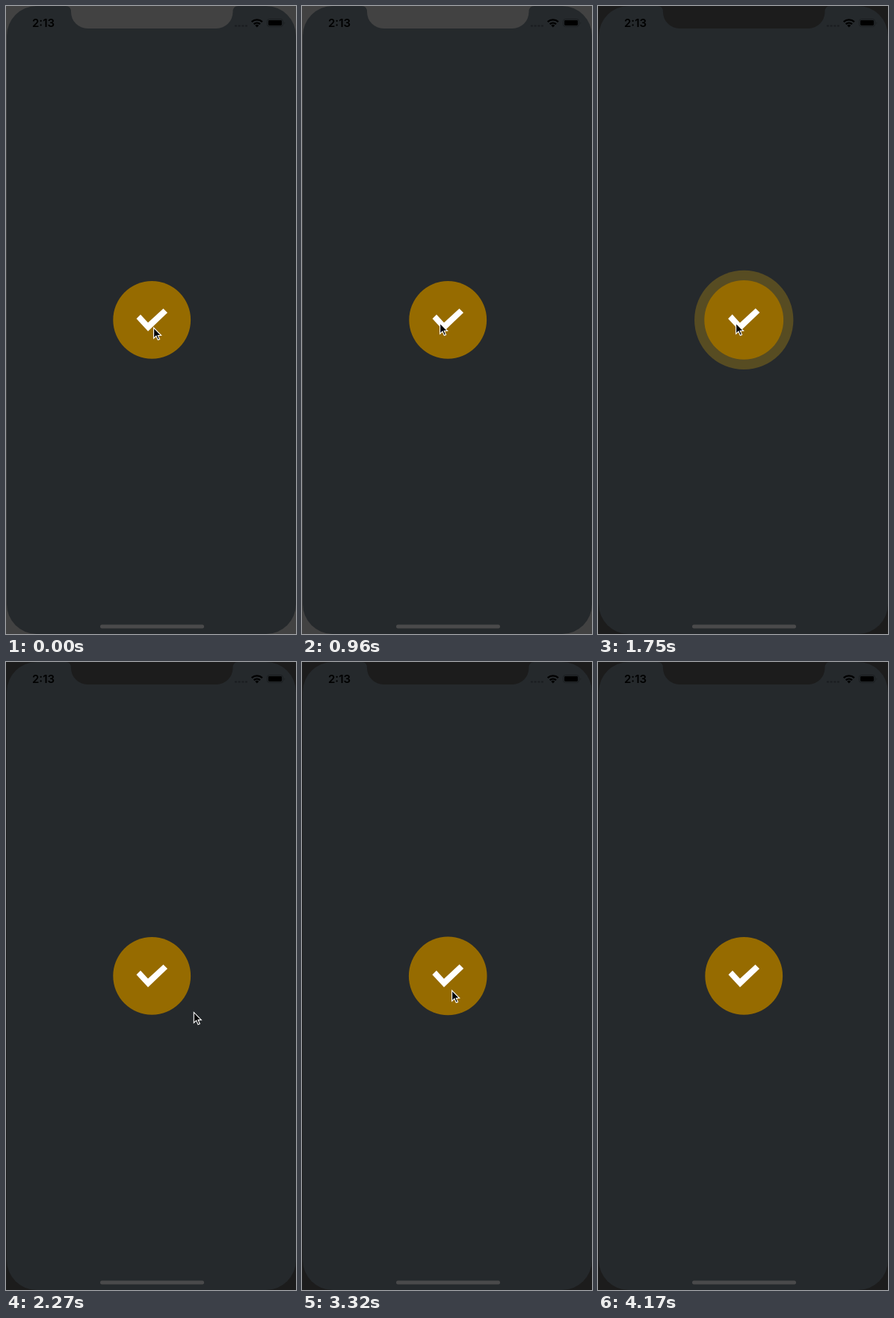
An HTML page that plays this animation: 388x838 px, repeating every 5150 ms.

```html
<!DOCTYPE html>
<html lang="en">
<head>
<meta charset="utf-8">
<title>Check button pulse</title>
<style>
  html, body { margin: 0; width: 100%; height: 100%; overflow: hidden; background: #1c1c1c; }
  svg { display: block; width: 388px; height: 838px; }
  text { font: 600 15px Inter, "Liberation Sans", sans-serif; }
</style>
</head>
<body>
<svg viewBox="0 0 388 838">
  <rect id="bezel" width="388" height="838"/>
  <rect x="1" width="387" height="838" rx="40" fill="#25292c"/>
  <path id="notch" d="M80 0Q87 0 87 8A22 22 0 0 0 109 30H281.5A22 22 0 0 0 303.5 8Q303.5 0 310.5 0Z"/>

  <text x="35" y="28.2">2:13</text>
  <path d="M306 26.5H323" stroke="#1a1d20" stroke-width="2" stroke-dasharray="3 1.7"/>
  <g fill="none" stroke="#000" stroke-width="2.3">
    <path d="M328.7 21.2A10.4 10.4 0 0 1 342.9 21.2"/>
    <path d="M331.6 24.2A6.2 6.2 0 0 1 340 24.2"/>
  </g>
  <path d="M333.4 26A3.5 3.5 0 0 1 338.2 26L335.8 28.4Z"/>
  <rect x="349.5" y="17.5" width="21" height="10" rx="3" fill="none" stroke="#1a1d1f"/>
  <rect x="351" y="19" width="18" height="7" rx="1.4"/>
  <path d="M372.5 21V24.6Q374 22.8 372.5 21Z" fill="#1a1d1f"/>
  <rect x="126" y="825.5" width="139" height="5" rx="2.5" fill="#4a4a4b"/>

  <g transform="translate(195.2 418.9)">
    <circle id="ring" fill="#ffbf00"/>
    <g id="button">
      <circle r="51.9" fill="#966b00"/>
      <path d="M-20.7-1.7L-15.2-7.2L-5.2 3.7L15.3-15.2L20.8-9.7L-5.2 15Z" fill="#fff"/>
    </g>
  </g>
  <path id="cursor" d="M.6 1.4V15.4L3.9 12.3L6.3 17.6L8.6 16.6L6.3 11.5H10.6Z" stroke="#fff" stroke-width="1.1"/>
</svg>
<script>
const LOOP = 5150, FOCUS = 1440, LEAVE = 4170, RADIUS = 52;
const presses = [1415, 3055];

// The picture only changes inside these stretches, in equal steps
const stretches = [
  { start: 590, end: 960, steps: 6 },
  { start: 1440, end: 1920, steps: 8 },
  { start: 1980, end: 2720, steps: 13 },
  { start: 3080, end: 4060, steps: 17 }
];

// Cursor moves along cubic curves
const moves = [
  { start: 530, end: 960, curve: [[197, 428], [210, 455], [226, 465], [184, 422]] },
  { start: 1940, end: 2400, curve: [[184, 422], [205, 430], [271, 443], [254, 517]] },
  { start: 2400, end: 2720, curve: [[254, 517], [233, 518], [200, 437], [200, 437]] },
  { start: 3714, end: 4060, curve: [[200, 437], [210, 450], [280, 570], [371, 716]] }
];

const [bezel, notch, ring, button, cursor] =
  ["bezel", "notch", "ring", "button", "cursor"].map(id => document.getElementById(id));

const clamp = v => Math.min(1, Math.max(0, v));

function snap(t) {
  const now = t + 5;
  const stretch = stretches.filter(s => s.start <= now).pop();
  if (!stretch) return 0;
  const { start, end, steps } = stretch;
  const step = (end - start) / steps;
  return Math.min(end, start + Math.floor((now - start) / step) * step);
}

function cursorAt(t) {
  const { start, end, curve: [a, b, c, d] } = moves.filter(m => m.start <= t).pop() || moves[0];
  const u = clamp((t - start) / (end - start)), v = 1 - u;
  return [0, 1].map(i => v ** 3 * a[i] + 3 * v * v * u * b[i] + 3 * v * u * u * c[i] + u ** 3 * d[i]);
}

// Dips under the press, then springs back past its size
const buttonScale = s => 1 - .3 * Math.exp(-s / 125) * Math.sin(2 * Math.PI * s / 480);

// Bursts out quickly, then slows down and fades
const ringGrowth = s => clamp((s - 257) / 456) ** .18;

function draw(t) {
  const pose = snap(t);
  const since = pose - (presses.filter(p => p <= pose).pop() ?? pose);
  const growth = ringGrowth(since);
  const shade = t < FOCUS ? "#424242" : "#1c1c1c";

  bezel.setAttribute("fill", shade);
  notch.setAttribute("fill", shade);
  button.setAttribute("transform", `scale(${buttonScale(since)})`);
  ring.setAttribute("r", growth && RADIUS + 20 * growth);
  ring.setAttribute("opacity", .8 * (1 - growth));
  cursor.setAttribute("transform", `translate(${cursorAt(pose)})`);
  cursor.setAttribute("visibility", t < LEAVE ? "visible" : "hidden");
}

const begin = performance.now();
function tick() {
  draw((performance.now() - begin) % LOOP);
  requestAnimationFrame(tick);
}
tick();
</script>
</body>
</html>
```
